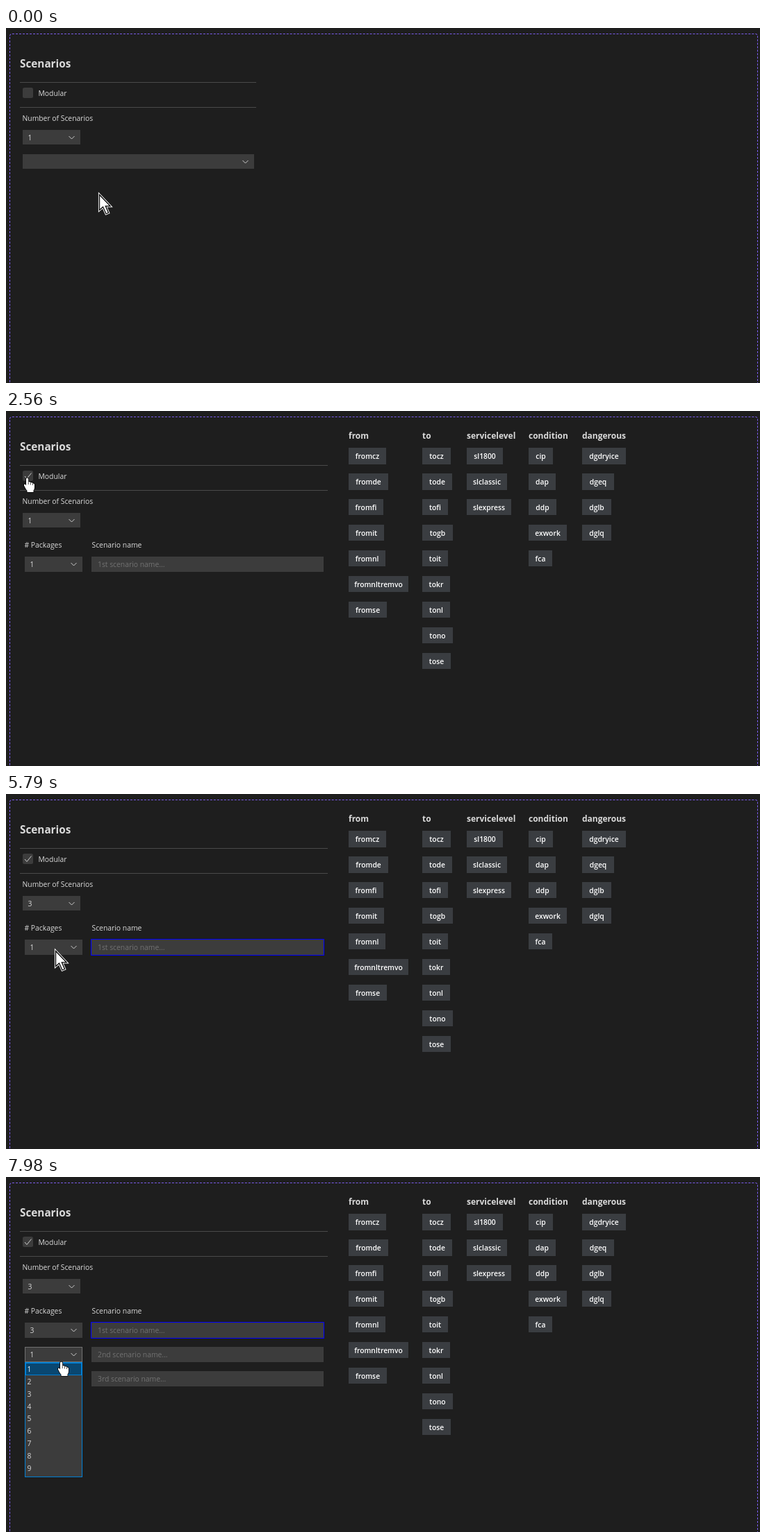
Animation of 1085x512 px, one loop 8000 ms. Source, as an HTML page with a canvas:

```html
<!DOCTYPE html>
<html lang="en">
<head>
<meta charset="utf-8">
<title>Scenarios</title>
<style>
  html, body { margin: 0; width: 100%; height: 100%; overflow: hidden; background: #1e1e1e; }
  .frame {
    position: fixed; left: 5px; top: 8px; bottom: 0; width: 1075px;
    border: 1px dashed #7b5cf0; border-bottom: 0; border-radius: 4px 4px 0 0;
  }
  canvas { position: fixed; left: 0; top: 0; display: block; }
</style>
</head>
<body>
<div class="frame"></div>
<canvas id="stage" width="1085" height="512"></canvas>
<script>
const ctx = document.getElementById('stage').getContext('2d');
const LOOP = 8000;
const FONT = '"Open Sans", "Noto Sans", sans-serif';
const FIELD = '#3c3c3c', TEXT = '#dadada', FOCUS = '#007fd4', PICK = '#094771', GREY = '#707070';

// Each column: x, title, then label and button width pairs.
const COLUMNS = [
  [493, 'from', 'fromcz 54 fromde 57 fromfi 50 fromit 51 fromnl 53 fromnltremvo 86 fromse 55'],
  [599, 'to', 'tocz 41 tode 43 tofi 37 togb 44 toit 37 tokr 40 tonl 40 tono 44 tose 41'],
  [663, 'servicelevel', 'sl1800 52 slclassic 58 slexpress 64'],
  [752, 'condition', 'cip 35 dap 39 ddp 40 exwork 55 fca 34'],
  [829, 'dangerous', 'dgdryice 63 dgeq 46 dglb 42 dglq 42']
];

// Pointer moves: first change, last change, steps, end x, end y.
const START = [134, 239];
const MOVES = [
  [70, 630, 8, 66, 83], [700, 840, 3, 50, 119], [900, 1220, 6, 31, 96],
  [2950, 3210, 5, 88, 185], [3350, 3600, 4, 76, 161], [4080, 4680, 8, 66, 212],
  [4950, 5470, 8, 78, 214], [5610, 5790, 3, 71, 225],
  [6790, 6930, 3, 71, 267], [7010, 7180, 3, 69, 281], [7450, 7760, 5, 80, 266]
];
const HAND_TIMES = [[1150, 1490], [1630, 2950], [3620, 5000], [6590, 7450], [7840, LOOP]];

const within = (t, a, b) => t >= a && t < b;

function rect(x, y, w, h, color) {
  ctx.fillStyle = color;
  ctx.fillRect(x, y, w, h);
}

function outline(x, y, w, h, color) {
  ctx.strokeStyle = color;
  ctx.lineWidth = 1;
  ctx.strokeRect(x + .5, y + .5, w - 1, h - 1);
}

function text(str, x, y, color = TEXT, size = 10.35, weight = 400, align = 'left') {
  ctx.font = `${weight} ${size}px ${FONT}`;
  ctx.textAlign = align;
  ctx.fillStyle = color;
  ctx.fillText(str, x, y);
}

function polyline(points, color, width = 1) {
  ctx.beginPath();
  points.forEach(([x, y]) => ctx.lineTo(x, y));
  ctx.strokeStyle = color;
  ctx.lineWidth = width;
  ctx.stroke();
}

function select(x, y, w, h, value, border) {
  rect(x, y, w, h, FIELD);
  if (border) outline(x, y, w, h, border);
  text(value, x + 7.5, y + 15);
  const cx = x + w - 12.5, cy = y + 11;
  polyline([[cx - 4, cy - 2], [cx, cy + 2], [cx + 4, cy - 2]], '#cccccc');
}

function list(x, y, h, hover, border, scrollbar) {
  const w = 83, inner = scrollbar ? 64 : 81, step = 17.85;
  rect(x, y, w, h, FIELD);
  for (let i = 0; i < 9; i++) {
    const top = Math.round(y + 1 + i * step);
    const active = i === 0 || i === hover;
    if (active) {
      rect(x + 1, top, inner, 18, PICK);
      outline(x + 1, top, inner, 18, FOCUS);
    }
    text(i + 1, x + 3.5, Math.round(y + 10 + i * step) + 4, active ? '#ffffff' : TEXT);
  }
  if (scrollbar) {
    rect(x + 65, y + 1, 17, h - 2, '#f1f1f1');
    rect(x + 67, y + 18, 13, 17, '#c1c1c1');
    triangle(x + 73.5, y + 10, -1, '#a3a3a3');
    triangle(x + 73.5, y + h - 10, 1, '#505050');
  }
  outline(x, y, w, h, border);
}

function triangle(x, y, dir, color) {
  ctx.beginPath();
  ctx.moveTo(x - 4, y - 2 * dir);
  ctx.lineTo(x + 4, y - 2 * dir);
  ctx.lineTo(x, y + 2 * dir);
  ctx.fillStyle = color;
  ctx.fill();
}

function drawColumns() {
  for (const [x, title, items] of COLUMNS) {
    text(title, x, 40, TEXT, 12, 700);
    const parts = items.split(' ');
    for (let i = 0; i < parts.length; i += 2) {
      const y = 53.1 + i / 2 * 36.95, w = +parts[i + 1];
      const top = Math.round(y), bottom = Math.round(y + 23.47);
      rect(x, top, w, bottom - top, '#3a3d41');
      text(parts[i], x + w / 2, top + 16, '#ffffff', 10.35, 600, 'center');
    }
  }
}

function drawHeader(t, modular) {
  const lineWidth = modular ? 443 : 340;
  text('Scenarios', 20, 57, TEXT, 15.3, 700);
  rect(20, 78, lineWidth, 1, '#4a4a4a');
  rect(20, 114, lineWidth, 1, '#4a4a4a');
  ctx.fillStyle = FIELD;
  ctx.beginPath();
  ctx.roundRect(24, 86, 15, 15, 2.5);
  ctx.fill();
  if (t >= 1490) polyline([[27, 94], [30, 97.5], [36.5, 89.5]], '#cccccc');
  text('Modular', 46.5, 98);
  text('Number of Scenarios', 23.5, 134);
}

function drawRows(t) {
  const rows = t >= 6010 ? 3 : 1;
  text('# Packages', 26.5, 197);
  text('Scenario name', 123.5, 197);
  for (let i = 0; i < rows; i++) {
    const y = 210 + i * 35;
    const open = i === 0 && within(t, 6550, 7380) ? FOCUS : i === 1 && t >= 7840 ? GREY : null;
    select(27, y, 83, 22, i === 0 && t >= 7380 ? 3 : 1, open);
    rect(123, y, 334, 22, FIELD);
    text(['1st', '2nd', '3rd'][i] + ' scenario name...', 132, y + 15, '#727272');
  }
  if (t >= 2700) outline(122, 209, 336, 24, '#0000ff');
}

function pointerAt(t) {
  let [x, y] = START;
  for (const [from, to, steps, endX, endY] of MOVES) {
    if (t < from) break;
    const done = Math.floor((t - from) / (to - from) * (steps - 1) + 1e-6) + 1;
    const p = Math.min(1, done / steps);
    x += (endX - x) * p;
    y += (endY - y) * p;
  }
  return [Math.round(x), Math.round(y)];
}

const ARROW = new Path2D('M0 0V22L5 17.5L9.5 27.5L13 26L8.8 16.3H15.5Z');
const HAND = new Path2D('M-2 1.5Q-2 0 -.5 0Q1.2 0 1.2 1.5V6Q4 5 4.5 7Q7 6 7.5 8Q10 7.5 10 10V14' +
  'Q10 16 8.5 18V20.5H-.5V18.5Q-2 17 -3.5 14L-5 11Q-5.5 9 -4 9Q-3 9 -2 11Z');
const KNUCKLES = new Path2D('M1.2 6V9.5M4.5 7V10M7.5 8V10.5');

function drawPointer(t, x, y) {
  ctx.save();
  ctx.lineJoin = 'round';
  ctx.fillStyle = '#ffffff';
  if (HAND_TIMES.some(([a, b]) => within(t, a, b))) {
    ctx.translate(x, y + .5);
    ctx.strokeStyle = '#000000';
    ctx.lineWidth = 1.6;
    ctx.stroke(HAND);
    ctx.fill(HAND);
    ctx.lineWidth = .7;
    ctx.stroke(KNUCKLES);
  } else {
    ctx.translate(x + .5, y + 1.5);
    ctx.lineJoin = 'miter';
    ctx.miterLimit = 3;
    ctx.strokeStyle = '#ffffff';
    ctx.lineWidth = 3.2;
    ctx.stroke(ARROW);
    ctx.fill(ARROW);
    ctx.strokeStyle = '#000000';
    ctx.lineWidth = 1.3;
    ctx.stroke(ARROW);
  }
  ctx.restore();
}

function draw(t) {
  const modular = t >= 2560;
  const countOpen = within(t, 3620, 4880);
  const [px, py] = pointerAt(t);
  const hovered = top => Math.max(0, Math.floor((py - top) / 17.85));

  ctx.clearRect(0, 0, 1085, 512);
  drawHeader(t, modular);
  select(24, 147, 83, 21, t >= 4880 ? 3 : 1, countOpen && FOCUS);
  if (modular) {
    drawColumns();
    drawRows(t);
  } else {
    select(24, 182, 333, 21, '');
  }
  if (countOpen) list(24, 168, 167, hovered(169), FOCUS, true);
  if (within(t, 6550, 7380)) list(27, 232, 166, hovered(233), GREY);
  if (t >= 7840) list(27, 267, 166, 0, FOCUS);
  drawPointer(t, px, py);
}

function tick(now) {
  draw(now % LOOP);
  requestAnimationFrame(tick);
}
draw(0);
requestAnimationFrame(tick);
</script>
</body>
</html>
```
